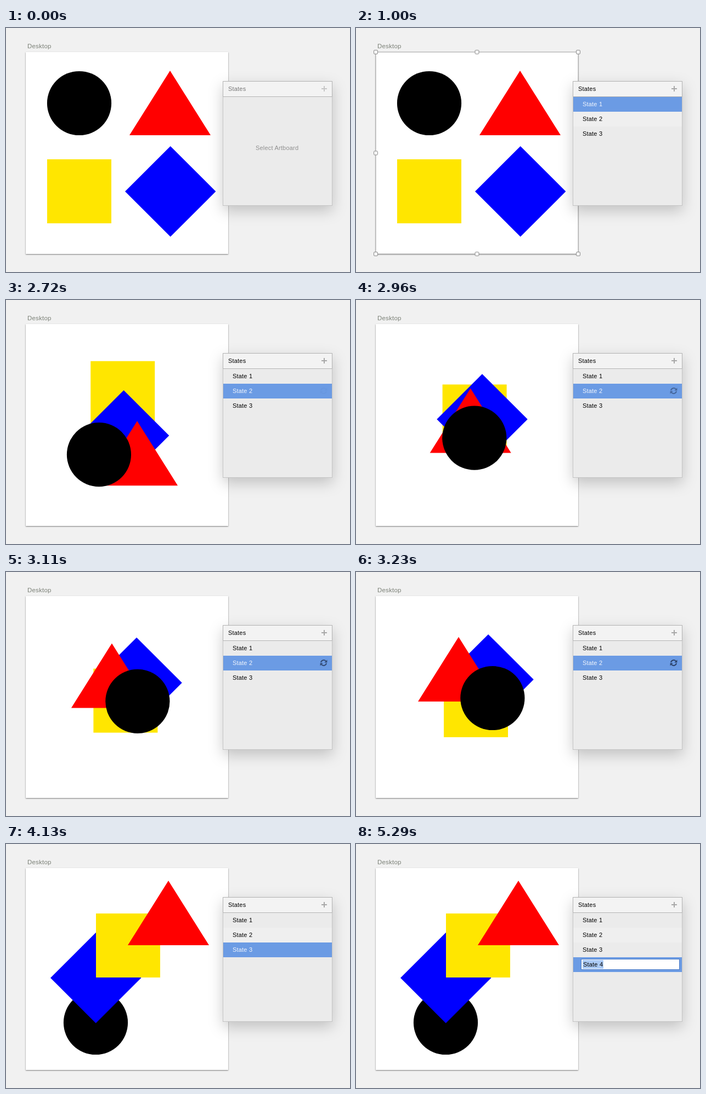
An HTML page that plays this animation: 627x446 px, repeating every 6120 ms.

```html
<!DOCTYPE html>
<html lang="en">
<head>
<meta charset="utf-8">
<title>Artboard states</title>
<style>
html, body { margin: 0; width: 100%; height: 100%; overflow: hidden; background: #f1f1f1; }
svg { display: block; font: 11px "Liberation Sans", Arial, sans-serif; letter-spacing: .2px; }
.board { filter: drop-shadow(0 1px 1.2px rgba(0,0,0,.5)); }
.panel { filter: drop-shadow(0 9px 13px rgba(0,0,0,.2)); }
</style>
</head>
<body>
<svg width="627" height="446" viewBox="0 0 627 446">
  <rect width="627" height="446" fill="#f1f1f1"/>
  <text x="39" y="37" font-size="11.5" fill="#7b8077">Desktop</text>
  <rect class="board" x="36" y="44" width="369" height="369" fill="#fff"/>
  <g id="shapes">
    <rect id="square" width="117" height="117" fill="#ffe600"/>
    <path id="diamond" d="M0-82.7L82.7 0L0 82.7L-82.7 0Z" fill="#00f"/>
    <path id="triangle" d="M0 0L74 118H-74Z" fill="#f00"/>
    <circle id="circle" r="58.6"/>
  </g>
  <g id="handles" fill="#f4f4f4" stroke="#8e8e8e">
    <rect x="36" y="44" width="369" height="369" fill="none" stroke="#a2a2a2"/>
  </g>
  <rect class="panel" x="395" y="97" width="200" height="228" fill="#ebebeb"/>
  <rect x="395.5" y="97.5" width="199" height="227" fill="#ebebeb" stroke="#c4c4c4"/>
  <path d="M395.5 125.5V97.5H594.5V125.5Z" fill="#f3f3f3" stroke="#b3b3b3"/>
  <text id="title" x="405" y="115">States</text>
  <path id="plus" d="M575 111H585M580 106V116" stroke-width="2"/>
  <text id="hint" x="455" y="223" fill="#8f8f8f">Select Artboard</text>
  <g id="rows"></g>
  <g id="sync" fill="#263a5e">
    <g id="arrow">
      <path d="M574 165.2A5.2 5.2 0 0 1 583 162.8" fill="none" stroke="#263a5e" stroke-width="1.9"/>
      <path d="M585.4 160.4V165.6H580.2Z"/>
    </g>
    <use href="#arrow" transform="rotate(180 579 166)"/>
  </g>
  <g id="field">
    <rect x="410.5" y="210.5" width="179" height="19" fill="#fff" stroke="#4c7cc6"/>
    <rect x="413" y="212" width="38" height="16" fill="#accbf6"/>
    <text x="414" y="224">State 4</text>
  </g>
</svg>
<script>
const $ = id => document.getElementById(id);
const LOOP = 6120, ROW = 27;

// Positions: square corner, diamond centre, triangle apex, circle centre
const poses = {
  grid:   { square: [75, 240],    diamond: [299.7, 298.7], triangle: [299, 78],  circle: [133.5, 137.5] },
  stack:  { square: [154, 109],   diamond: [213.6, 249.7], triangle: [241, 225], circle: [166.5, 284.5] },
  house:  { square: [160.6, 192], diamond: [243.6, 191.7], triangle: [182, 109], circle: [256.5, 225.5] },
  stairs: { square: [164, 127],   diamond: [163.7, 244.7], triangle: [296, 67],  circle: [163.5, 326.5] }
};
const orders = {
  normal: ["square", "diamond", "triangle", "circle"],
  stairs: ["circle", "diamond", "square", "triangle"]
};

function add(parent, tag, attrs) {
  const el = document.createElementNS("http://www.w3.org/2000/svg", tag);
  for (const k in attrs) el.setAttribute(k, attrs[k]);
  return parent.appendChild(el);
}

for (const x of [36, 220.5, 405])
  for (const y of [44, 228.5, 413])
    if (x !== 220.5 || y !== 228.5)
      add($("handles"), "rect", { x: x - 3.5, y: y - 3.5, width: 7, height: 7, rx: 1.5 });

const rows = [1, 2, 3, 4].map((n, i) => {
  const g = add($("rows"), "g", {});
  const y = 126 + i * ROW;
  const bar = add(g, "rect", { x: 396, y, width: 198, height: ROW });
  const label = add(g, "text", { x: 413, y: y + 17 });
  label.textContent = "State " + n;
  return { g, bar, label };
});

// Cubic bezier easing (.45, 0, .15, 1)
function ease(u) {
  if (u <= 0 || u >= 1) return u <= 0 ? 0 : 1;
  const curve = (a, b, s) => 3 * (1 - s) * s * ((1 - s) * a + s * b) + s ** 3;
  let lo = 0, hi = 1;
  for (let i = 0; i < 24; i++) {
    const mid = (lo + hi) / 2;
    if (curve(.45, .15, mid) < u) lo = mid; else hi = mid;
  }
  return curve(0, 1, lo);
}

const show = (el, on) => el.setAttribute("visibility", on ? "visible" : "hidden");

let order = "normal";
function setOrder(name) {
  if (name === order) return;
  order = name;
  orders[name].forEach(id => $("shapes").append($(id)));
}

function place(from, to, p) {
  for (const id in from) {
    const [x, y] = from[id].map((v, i) => v + (to[id][i] - v) * p);
    $(id).setAttribute("transform", `translate(${x} ${y})`);
  }
}

function draw(t) {
  const idle = t < 1000, editing = t >= 5090;
  const selected = idle ? -1 : t < 2000 ? 0 : t < 4130 ? 1 : editing ? 3 : 2;
  const step = Math.floor((t - 2600) / 30 + .01) * 30;
  const p = ease(step / 980);

  setOrder(t < 4130 ? "normal" : "stairs");
  if (t < 2000) place(poses.grid, poses.grid, 0);
  else if (t < 4130) place(poses.stack, poses.house, p);
  else place(poses.stairs, poses.stairs, 0);

  show($("handles"), selected === 0);
  show($("hint"), idle);
  show($("field"), editing);
  $("sync").setAttribute("opacity", t < 4130 ? p : 0);
  $("title").setAttribute("fill", idle ? "#777" : "#000");
  $("plus").setAttribute("stroke", idle ? "#c6c6c6" : t >= 4960 && t < 5290 ? "#555" : "#a8a8a8");

  rows.forEach(({ g, bar, label }, i) => {
    const on = i === selected;
    const striped = i === 1 && selected !== 1;
    show(g, !idle && (i < 3 || editing));
    bar.setAttribute("fill", on ? "#6b9be4" : striped ? "#efefef" : "#ebebeb");
    label.setAttribute("fill", on ? "#f2f6fd" : "#000");
    if (i === 3) show(label, false);
  });
}

const start = performance.now();
function tick() {
  draw((performance.now() - start) % LOOP);
  requestAnimationFrame(tick);
}
tick();
</script>
</body>
</html>
```
